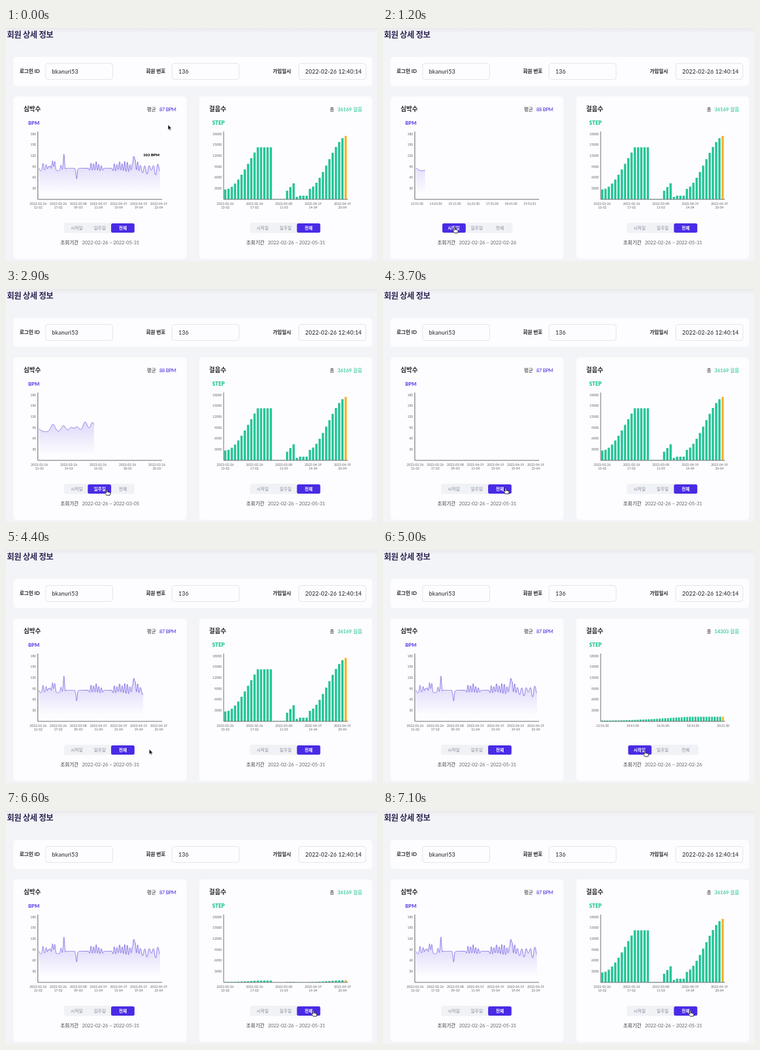
These frames come from a looping animation (600 px wide and 378 px high, 7.2 s). An HTML page:

```html
<!DOCTYPE html>
<html lang="ko">
<head>
<meta charset="utf-8">
<title>회원 상세 정보</title>
<style>
  html, body { margin: 0; width: 100%; height: 100%; overflow: hidden; background: #f3f4f8; }
  svg { display: block; width: 600px; height: 378px; }
  text { font: 500 8px Lato, "Noto Sans CJK KR", "Noto Sans CJK", sans-serif; fill: #2c2c32; }
  .title { font-size: 13px; font-weight: 700; letter-spacing: -.42px; fill: #2b2452; }
  .label { font-weight: 700; fill: #1d1d22; }
  .value { font-size: 9px; letter-spacing: .25px; }
  .head { font-size: 10px; font-weight: 700; fill: #1d1d22; }
  .end { text-anchor: end; }
  .mid { text-anchor: middle; }
  .unit { font-weight: 900; }
  .bpm { fill: #6450ee; }
  .step { fill: #1fc795; font-size: 8.5px; }
  .tick { font-size: 5.1px; font-weight: 400; fill: #606066; }
  .tab { font-size: 7px; text-anchor: middle; fill: #858a98; }
  .tab.on { font-weight: 700; fill: #fff; }
  .dates { font-weight: 400; letter-spacing: -.1px; fill: #66666c; }
  .tip { font-size: 6.2px; font-weight: 900; fill: #111; }
  .card { fill: #fdfcfe; }
  .field { fill: #fdfcfe; stroke: #e3e3ea; }
  .axis { fill: none; stroke: #68686e; }
</style>
</head>
<body>
<svg viewBox="0 0 600 378">
  <defs>
    <linearGradient id="shade" x1="0" y1="0" x2="0" y2="1">
      <stop offset="0" stop-color="#e9e9ed"/><stop offset="1" stop-color="#f3f4f8"/>
    </linearGradient>
    <linearGradient id="haze" gradientUnits="userSpaceOnUse" x1="0" y1="200" x2="0" y2="268">
      <stop offset="0" stop-color="#6b55ee" stop-opacity=".28"/>
      <stop offset="1" stop-color="#6b55ee" stop-opacity="0"/>
    </linearGradient>
    <clipPath id="reveal"><rect id="wipe" x="51" y="160" width="202" height="120"/></clipPath>
  </defs>
  <rect width="600" height="378" fill="#f3f4f8"/>
  <rect width="600" height="8" fill="url(#shade)"/>
  <text class="title" x="1.5" y="15">회원 상세 정보</text>

  <rect class="card" x="12" y="47" width="580" height="47" rx="5"/>
  <rect class="field" x="64" y="57.5" width="108.5" height="26" rx="4"/>
  <rect class="field" x="268.5" y="57.5" width="108.5" height="26" rx="4"/>
  <rect class="field" x="473.5" y="57.5" width="108.5" height="26" rx="4"/>
  <text class="label" x="22" y="73">로그인 ID</text>
  <text class="value" x="74.5" y="73.6">bkanuri53</text>
  <text class="label" x="226.5" y="73">회원 번호</text>
  <text class="value" x="279" y="73.6">136</text>
  <text class="label" x="431.5" y="73">가입일시</text>
  <text class="value" x="484" y="73.6">2022-02-26 12:40:14</text>

  <rect class="card" x="12" y="111" width="280" height="263.5" rx="5"/>
  <rect class="card" x="312.5" y="111" width="279.5" height="263.5" rx="5"/>
  <text class="head" x="28.5" y="135">심박수</text>
  <text class="head" x="328.5" y="135">걸음수</text>
  <text x="228" y="134.5">평균</text>
  <text x="523.5" y="134.5">총</text>
  <text class="unit bpm" x="36" y="157.3">BPM</text>
  <text class="unit step" x="333.5" y="157.3">STEP</text>

  <g id="left"></g>
  <g id="right"></g>
  <text class="tip" id="tip" x="222" y="208.3">102 BPM</text>

  <g id="cursor">
    <path id="arrow" d="M0 0V8.2L1.9 6.5L3.2 9.3L4.5 8.7L3.2 6H5.8Z" fill="#111" stroke="#fff" stroke-width=".5"/>
    <path id="hand" d="M-1 .8C-1-.3 .8-.3 .8 .8V4L4.5 4.8C5.3 5 5.5 5.6 5.4 6.3L4.8 9.5H-.5L-3.3 5.8C-3.6 5-2.6 4.3-1.9 5L-1 5.9Z"
      fill="#fff" stroke="#15151a" stroke-width=".9" stroke-linejoin="round"/>
  </g>
</svg>
<script>
const LOOP = 7200, BASE = 278, MODES = ['day', 'week', 'all'];
const $ = id => document.getElementById(id);
const clamp = v => Math.min(1, Math.max(0, v));
const smooth = u => u * u * (3 - 2 * u);
const mix = (a, b, k) => a + (b - a) * k;
const range = (n, f) => Array.from({ length: n }, (_, i) => f(i));

function add(parent, tag, attrs, text) {
  const el = document.createElementNS('http://www.w3.org/2000/svg', tag);
  for (const k in attrs) el.setAttribute(k, attrs[k]);
  if (text) el.textContent = text;
  parent.appendChild(el);
  return el;
}

// CSS "ease": cubic-bezier(.25, .1, .25, 1)
function ease(x) {
  if (x <= 0) return 0;
  if (x >= 1) return 1;
  const at = (a, b, s) => 3 * a * s * (1 - s) ** 2 + 3 * b * s * s * (1 - s) + s ** 3;
  let lo = 0, hi = 1;
  for (let i = 0; i < 24; i++) {
    const m = (lo + hi) / 2;
    if (at(.25, .25, m) < x) lo = m; else hi = m;
  }
  return at(.1, 1, lo);
}

// Pulse of the first day: a resting level with beats of [x, height]
const beats = [[53, 4], [76, 12], [93, 10], [105.5, 7], [115, 8], [128, 16], [140, 15], [174, 9], [190, 27]];
const bell = (x, c, w) => Math.exp(-(((x - c) / w) ** 2));
function pulse(x) {
  const rest = 231.5 - 4 * clamp((x - 197) / 4);
  return beats.reduce((y, [c, h]) => y - h * bell(x, c, 4.8), rest);
}
const pulseDay = range(197, i => [53 + i, pulse(53 + i)]);

// Later days: seeded zigzag with two calm spells, one drop, one spike and slow sags
function random(i) {
  const v = Math.sin(i * 12.9898 + 4.1) * 43758.5453;
  return v - Math.floor(v);
}
function later(x, i) {
  const calm = x < 135 || (x > 158 && x < 172);
  const swing = i % 2 ? 2 + 4 * random(i) : -4 - 8 * random(i);
  return 227.5 + (calm ? 0 : swing) + 18 * bell(x, 114, 1.5) - 26 * bell(x, 207, 1.2)
    + 9 * bell(x, 226, 4) + 5 * bell(x, 242, 3);
}
const pulseAll = pulseDay.map(([x, y]) => [53 + (x - 53) * .297, y])
  .concat(range(51, i => 112.2 + i * 2.1).concat(range(9, i => 221 + i * 3.5)).map((x, i) => [x, later(x, i)]));

function curve(pts) {
  return pts.map(([x, y], i) => {
    if (!i) return `M${x} ${y}`;
    const [px, py] = pts[i - 1], m = (x + px) / 2;
    return `C${m} ${py} ${m} ${y} ${x} ${y}`;
  }).join('');
}

// Bar heights in pixels; slot counts half hours
function firstDay(slot) {
  const u = clamp(slot / 10);
  return 16 + 68.5 * mix(u * u, smooth(u), .4);
}
function steps(slot) {
  if (slot < 15) return firstDay(slot);
  if (slot < 19) return .6;
  if (slot < 22) return 14 + 6 * (slot - 19);
  if (slot < 26) return slot == 22 ? 4 : 6;
  const u = (slot - 26) / 11;
  return 17 + 86 * mix(u, smooth(u), .7);
}
const stepDay = range(45, i => firstDay((i - 2) / 3));
const stepWeek = range(15, steps);
const stepAll = range(38, steps);

function drawPulse(g, pts) {
  const d = curve(pts);
  const box = add(g, 'g', { 'clip-path': 'url(#reveal)' });
  add(box, 'path', { d: `${d}V${BASE}H53Z`, fill: 'url(#haze)' });
  add(box, 'path', { d, fill: 'none', stroke: '#7563e2', 'stroke-width': .85 });
}

function drawBars(g, list) {
  const pitch = 200 / list.length, w = pitch * .68;
  const box = add(g, 'g', { class: 'bars' });
  list.forEach((h, i) => add(box, 'rect', {
    x: 352 + pitch * (i + .5) - w / 2, y: BASE - h, width: w, height: h,
    fill: i == list.length - 1 ? '#f5b52e' : '#24c596'
  }));
}

const evenly = (from, gap, names) => names.map((n, i) => [from + gap * i, ...n.split(' ')]);
const weekNames = ['12', '14', '16', '18', '20'].map(h => `2022-02-26 ${h}-02`);

const charts = [{
  root: $('left'), dx: 0, unit: 30, value: { day: '88 BPM', week: '88 BPM', all: '87 BPM' },
  tint: '#4f39e0', gap: '-.3px', valueX: 275, span: 1300,
  plan: [[-9999, 'all'], [1080, 'day'], [2550, 'week'], [3690, 'all']],
  draw: drawPulse, data: { day: pulseDay, week: pulseDay, all: pulseAll },
  ticks: {
    day: evenly(55, 30.4, ['12:51:30', '14:01:30', '15:11:30', '16:21:30', '17:31:30', '18:41:30', '19:51:31']),
    week: evenly(54, 47.5, weekNames),
    all: evenly(52, 32.5, ['2022-02-26 12-02', '2022-02-26 17-02', '2022-03-08 09-03', '2022-04-19 11-04',
      '2022-04-19 15-04', '2022-04-19 19-04', '2022-04-19 23-04'])
  },
  grow: p => $('wipe').setAttribute('width', 202 * p)
}, {
  root: $('right'), dx: 300.5, unit: 3000, value: { day: '14303 걸음', week: '14303 걸음', all: '36169 걸음' },
  tint: '#14c08c', gap: '0', valueX: 576, span: 450,
  plan: [[-9999, 'all'], [4958, 'day'], [5850, 'week'], [6578, 'all']],
  draw: drawBars, data: { day: stepDay, week: stepWeek, all: stepAll },
  ticks: {
    day: evenly(355, 48.8, ['12:51:30', '14:41:30', '16:31:30', '18:31:30', '20:21:30']),
    week: evenly(358.7, 40, weekNames),
    all: evenly(354.5, 47.4, ['2022-02-26 13-02', '2022-02-26 17-02', '2022-03-08 11-03',
      '2022-04-19 14-04', '2022-04-19 20-04'])
  },
  grow(p) {
    for (const b of this.root.querySelectorAll('.bars'))
      b.setAttribute('transform', `translate(0 ${BASE * (1 - p)}) scale(1 ${p})`);
  }
}];

const until = { day: '02-26', week: '03-05', all: '05-31' };

function build(c) {
  const { root, dx } = c;
  c.views = {};
  MODES.forEach((mode, at) => {
    const g = c.views[mode] = add(root, 'g', {});
    c.draw(g, c.data[mode]);
    for (const [x, ...lines] of c.ticks[mode])
      lines.forEach((s, i) => add(g, 'text', { class: 'tick mid', x, y: 286.6 + 6.8 * i }, s));
    add(g, 'text', { class: 'end', x: c.valueX, y: 134.5, style: `fill:${c.tint};letter-spacing:${c.gap}` }, c.value[mode]);
    const shift = mode == 'day' ? 1.5 : 0;
    add(g, 'rect', { x: dx + 94 + shift, y: 316, width: 114, height: 16.5, rx: 3, fill: '#f0f2f6' });
    add(g, 'rect', { x: dx + 94.5 + shift + 38 * at - at / 4, y: 317, width: 37.8, height: 15, rx: 2.5, fill: '#492be6' });
    ['시작일', '일주일', '전체'].forEach((s, i) => add(g, 'text',
      { class: i == at ? 'tab on' : 'tab', x: dx + 114.5 + 37.2 * i, y: 326.8 }, s));
    add(g, 'text', { class: 'dates', x: dx + 123, y: 351.3 }, `2022-02-26 ~ 2022-${until[mode]}`);
  });
  add(root, 'text', { x: dx + 88, y: 351.3 }, '조회기간');
  for (let i = 1; i <= 6; i++)
    add(root, 'text', { class: 'tick end', x: dx + 48.3, y: BASE + 1.6 - 17.67 * i }, String(c.unit * i));
  add(root, 'path', { class: 'axis', d: `M${dx + 51.5} 168V${BASE}H${dx + 252.5}` });
}
charts.forEach(build);

// Pointer moves: start, end, target
const moves = [
  [50, 680, 116, 323], [1850, 2080, 158, 325.5], [2800, 3250, 198.5, 322.8],
  [4280, 4780, 424, 325.5], [5350, 5680, 453.5, 324.8], [6080, 6450, 497.3, 323.6]];

function pointer(t) {
  let x = 262, y = 157;
  for (const [a, b, tx, ty] of moves) {
    const p = smooth(clamp((t - a) / (b - a)));
    x = mix(x, tx, p);
    y = mix(y, ty, p);
  }
  return [x, y];
}

const show = (el, on) => el.setAttribute('visibility', on ? 'visible' : 'hidden');

function render(t) {
  for (const c of charts) {
    const [from, mode] = c.plan.filter(s => s[0] <= t).pop();
    for (const m of MODES) c.views[m].setAttribute('display', m == mode ? 'inline' : 'none');
    c.grow(ease((t - from) / c.span));
  }
  const [x, y] = pointer(t);
  const over = y > 316 && charts.some(({ dx }) => x > dx + 94 && x < dx + 208);
  $('cursor').setAttribute('transform', `translate(${x} ${y})`);
  show($('arrow'), !over);
  show($('hand'), over);
  show($('tip'), t < 150);
}

const start = performance.now();
function tick() {
  render((performance.now() - start) % LOOP);
  requestAnimationFrame(tick);
}
tick();
</script>
</body>
</html>
```
